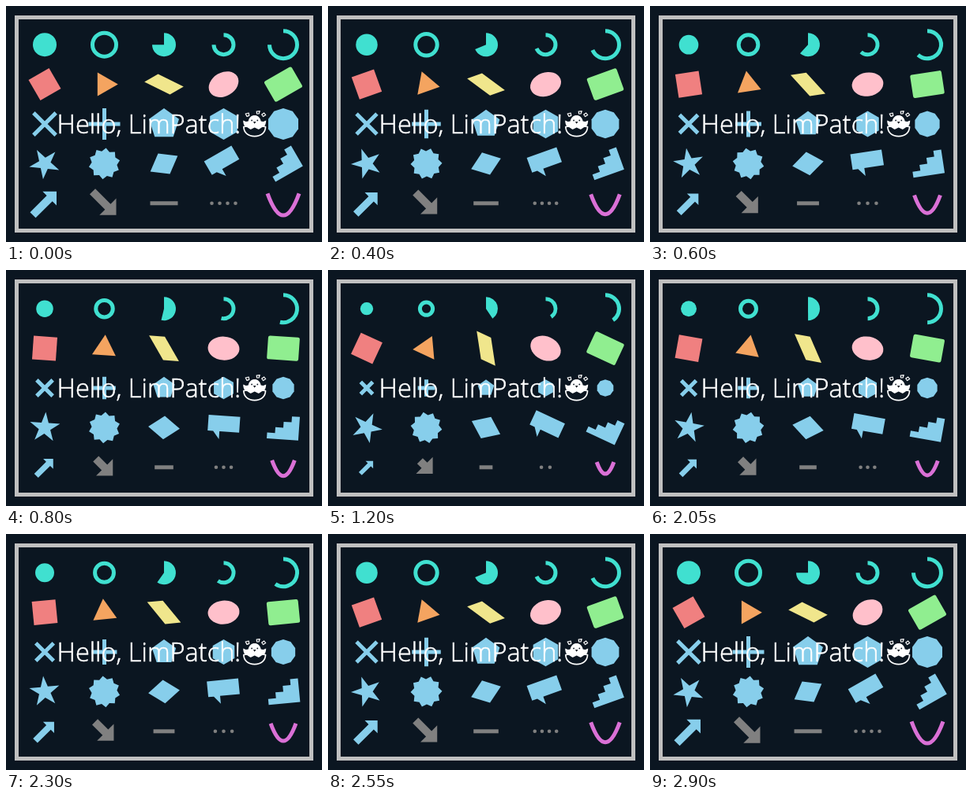
Recreate the animation shown at these times as an HTML page. Size 400 px wide and 300 px high, loop 2950 ms.

```html
<!DOCTYPE html>
<html lang="en">
<head>
<meta charset="utf-8">
<title>Shape board</title>
<style>
  html, body { margin: 0; width: 100%; height: 100%; overflow: hidden; background: #0b1621; }
  svg { display: block; width: 100vw; height: 100vh; }
  text { font: 300 32.5px "Open Sans", "Noto Sans", sans-serif; fill: #fff; stroke: #fff; stroke-width: .6; }
  .teal { fill: #40e0d0; }
  .tealLine { fill: none; stroke: #40e0d0; stroke-width: 5; }
  .sky { fill: #87ceeb; }
  .skyLine { fill: none; stroke: #87ceeb; stroke-width: 5; }
  .gray { fill: #808080; }
  .grayLine { fill: none; stroke: #808080; stroke-width: 5; }
  .orchidLine { fill: none; stroke: #da70d6; stroke-width: 5; }
  .shell { fill: #0b1621; stroke: #fff; stroke-width: 1.7; stroke-linejoin: round; }
  .chip { fill: none; stroke: #fff; stroke-width: 1.2; stroke-linejoin: round; }
</style>
</head>
<body>
<svg viewBox="0 0 400 300">
  <rect x="13.5" y="14.5" width="373" height="271" fill="none" stroke="#c0c0c0" stroke-width="5"/>
  <g id="board"></g>
  <text x="64.5" y="162">Hello, LimPatch!</text>
  <g id="chick" transform="translate(314.7 150)">
    <path fill="#fff" d="M-8 5 C-12 5 -14.5 1 -14.5 -4.5 L-11 -3 L-8 -3.5 C-7 -8.5 -4 -11 0 -11 S7 -8.5 8 -3.5 L11 -3 L14.5 -4.5 C14.5 1 12 5 8 5Z"/>
    <path class="shell" d="M-13.8 3.5 L-9.5 3 L-5 6 L0 3.5 L5 6 L9.5 3 L13.8 3.5 C13.8 11 8 15.6 0 15.6 S-13.8 11 -13.8 3.5Z"/>
    <g fill="#0b1621">
      <circle cx="-3.6" cy="-4.6" r=".9"/>
      <circle cx="3.6" cy="-4.6" r=".9"/>
      <path d="M-1.8 -3H1.8L0 -.2Z"/>
    </g>
    <path class="chip" d="M-11.5 -13 l4 -1 l.6 3.4 l-2.8 1Z M2.5 -16 l4 -.4 l-1 3.2 l-2.6 .2Z M9 -12 l3 -2 l2 2.5 l-3.2 2Z"/>
  </g>
</svg>
<script>
const PERIOD = 2950, STEP = 50;
const board = document.getElementById("board");
const updaters = [];

function add(parent, tag, attrs) {
  const el = document.createElementNS("http://www.w3.org/2000/svg", tag);
  set(el, attrs);
  parent.append(el);
  return el;
}

function set(el, attrs) {
  for (const key in attrs) el.setAttribute(key, attrs[key]);
}

function cell(col, row) {
  const x = 200 + 75.5 * (col - 2), y = 150 + 50.4 * (row - 2);
  return add(board, "g", { transform: `translate(${x} ${y})` });
}

// draw(scale, angle) returns the attributes for the moment
function shape(col, row, tag, attrs, draw) {
  const el = add(cell(col, row), tag, attrs);
  updaters.push((s, a) => set(el, draw(s, a)));
}

const turn = (s, a) => ({ transform: `rotate(${a})` });
const zoom = s => ({ transform: `scale(${s})` });

function polar(r, deg) {
  const a = deg * Math.PI / 180;
  return [r * Math.sin(a), -r * Math.cos(a)];
}

function ring(n, r, inner = r) {
  return Array.from({ length: n }, (_, i) => polar(i % 2 ? inner : r, 360 * i / n)).join(" ");
}

function arc(r, deg) {
  return `M0 ${-r}A${r} ${r} 0 ${deg > 180 ? 1 : 0} 1 ${polar(r, deg)}`;
}

const slash = (x, y) => `M${-x} ${-y}L${x} ${y}`;

// arrow along +x, from -len to len
function arrow(len, half, head) {
  const neck = len - head;
  return `${-len},${-half} ${neck},${-half} ${neck},${-head} ${len},0 ` +
         `${neck},${head} ${neck},${half} ${-len},${half}`;
}

// Row 1: circles and arcs
shape(0, 0, "circle", { class: "teal" }, s => ({ r: 15 * s }));
shape(1, 0, "circle", { class: "tealLine" }, s => ({ r: 15 * s }));
shape(2, 0, "path", { class: "teal" }, s => ({ d: arc(15, 270 * s) + "L0 0Z" }));
shape(3, 0, "path", { class: "tealLine" }, s => ({ d: arc(12.5, 270 * s) }));
shape(4, 0, "path", { class: "tealLine" }, s => ({ d: arc(17.5, 270 * s) }));

// Row 2: turning basics
shape(0, 1, "rect", { x: -15, y: -15, width: 30, height: 30, fill: "#f08080" }, turn);
shape(1, 1, "polygon", { points: ring(3, 17.32), fill: "#f4a460" }, turn);
shape(2, 1, "polygon", { points: "-20,-15 0,-15 20,15 0,15", fill: "#f0e68c" }, turn);
shape(3, 1, "ellipse", { rx: 20, ry: 15, fill: "#ffc0cb" }, turn);
shape(4, 1, "rect", { x: -20, y: -15, width: 40, height: 30, rx: 2.5, fill: "#90ee90" }, turn);

// Row 3: growing shapes
shape(0, 2, "path", { class: "skyLine" }, s => {
  const k = 20 * s * Math.SQRT1_2;
  return { d: slash(k, k) + slash(k, -k) };
});
shape(1, 2, "path", { class: "skyLine" }, s => ({ d: slash(20 * s, 0) + slash(0, 20 * s) }));
[5, 6, 10].forEach((n, i) =>
  shape(2 + i, 2, "polygon", { class: "sky", points: ring(n, 20) }, zoom));

// Row 4: turning figures
shape(0, 3, "polygon", { class: "sky", points: ring(10, 20, 7.64) }, turn);
shape(1, 3, "polygon", { class: "sky", points: ring(20, 20, 16) }, turn);
shape(2, 3, "polygon", { class: "sky", points: "-20,0 0,-15 20,0 0,15" }, turn);
shape(3, 3, "polygon", { class: "sky", points: "-20,-15 20,-15 20,5 -5,5 -5,15 -13,5 -20,5" }, turn);
shape(4, 3, "path", { class: "sky", d: "M-20 15" + "v-7.5h10".repeat(4) + "V15Z" }, turn);

// Row 5: lines
const REACH = 15 * Math.SQRT2;
shape(0, 4, "polygon", { class: "sky", points: arrow(REACH, 5, 12.5) },
  s => ({ transform: `rotate(-45) scale(${s})` }));
shape(1, 4, "polygon", { class: "gray", transform: "rotate(45)" },
  s => ({ points: arrow(REACH * s, 5, 15) }));
shape(2, 4, "path", { class: "grayLine" }, s => ({ d: slash(20 * s - 2.5, 0) }));
shape(3, 4, "path", { class: "gray" }, s => {
  const len = 40 * s, n = Math.round(len / 10), r = 2.3;
  let d = "";
  for (let i = 0; i < n; i++) {
    const x = len * ((i + 0.5) / n - 0.5);
    d += `M${x - r} 0a${r} ${r} 0 1 1 ${2 * r} 0a${r} ${r} 0 1 1 ${-2 * r} 0Z`;
  }
  return { d };
});
shape(4, 4, "path", { class: "orchidLine" },
  s => ({ d: `M${-20 * s} ${-12.5 * s}Q0 ${43 * s} ${20 * s} ${-12.5 * s}` }));

const start = performance.now();

function frame(now) {
  const t = Math.floor((Math.max(0, now - start) % PERIOD) / STEP) * STEP;
  const p = 0.5 + 0.5 * Math.cos(2 * Math.PI * t / PERIOD);
  for (const update of updaters) update(0.5 + 0.5 * p, 30 - 60 * p);
  requestAnimationFrame(frame);
}
frame(start);
</script>
</body>
</html>
```
